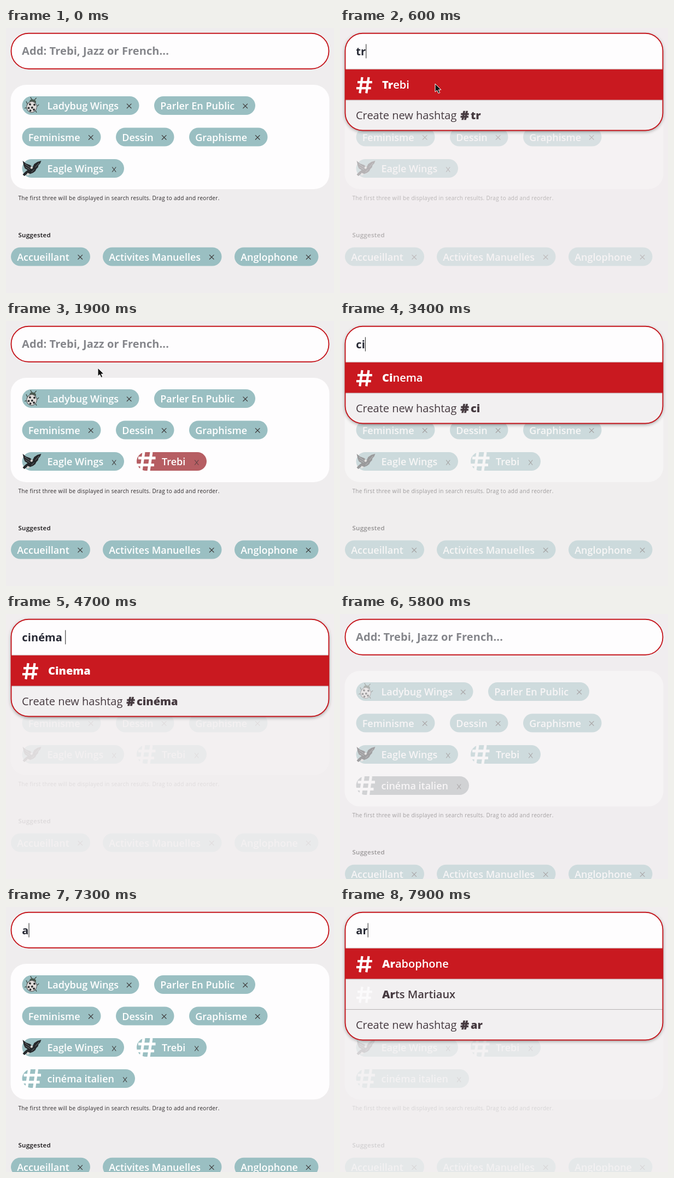
Recreate the animation shown at these times as an HTML page. Size 600x485 px, loop 8000 ms.

```html
<!DOCTYPE html>
<html lang="en">
<head>
<meta charset="utf-8">
<title>Tag input</title>
<style>
  html, body { margin: 0; width: 100%; height: 100%; overflow: hidden; background: #efedee; }
  svg { display: block; }
  text { font: 600 20px "Open Sans", "Noto Sans", sans-serif; white-space: pre; }
  .pill { font-size: 18px; fill: #fff; }
  .input { font-weight: 700; letter-spacing: .1px; }
  .note { font-size: 10px; font-weight: 400; letter-spacing: .31px; fill: #2e2a2c; }
  .head { font-size: 11.5px; letter-spacing: .28px; fill: #151214; }
  .strong { font-weight: 800; }
  .sign { font-weight: 800; font-size: 23px; stroke: currentColor; stroke-width: .7; }
  .plain { font-weight: 400; }
</style>
</head>
<body>
<svg id="stage" width="600" height="485" viewBox="0 0 600 485"></svg>
<script>
const LOOP = 8000, ROW = 56, FADE = 600, PULSE = 1250;
const RED = [201, 25, 32], TEAL = [154, 191, 194];
const stage = document.getElementById('stage');

// keys: time of each key press; drop: time the list opens
const sessions = [
  { drop: 300, close: 950, text: 'tr', keys: [100, 350] },
  { drop: 3180, close: 5700, text: 'cinéma italien',
    keys: [3000, 3280, 3500, 3780, 3950, 4150, 4430, 4750, 4850, 4950, 5050, 5150, 5250, 5350] },
  { drop: 7450, close: LOOP, text: 'ar', keys: [7250, 7650] }
];
const words = ['Trebi', 'Cinema', 'Arabophone', 'Arts Martiaux'];

// left, right, top, label, icon, time added
const tags = [
  [29.5, 243.5, 125, 'Ladybug Wings', ladybug],
  [271, 456, 125, 'Parler En Public'],
  [29.5, 173.5, 182.5, 'Feminisme'],
  [201, 307.5, 182.5, 'Dessin'],
  [335, 478.5, 182.5, 'Graphisme'],
  [29.5, 216, 240, 'Eagle Wings', eagle],
  [239, 367, 240, 'Trebi', hash, sessions[0].close],
  [29.5, 236, 297, 'cinéma italien', hash, sessions[1].close]
];
const suggested = [
  [9, 154, 401.5, 'Accueillant'],
  [177, 394.5, 401.5, 'Activites Manuelles'],
  [418, 571.5, 401.5, 'Anglophone']
];

const clamp = v => Math.min(1, Math.max(0, v));
const ease = p => 1 - (1 - clamp(p)) ** 2.2;
const mix = (a, b, p) => `rgb(${a.map((v, i) => Math.round(v + (b[i] - v) * p))})`;
const fold = s => s.normalize('NFD').replace(/[\u0300-\u036f]/g, '').toLowerCase().trim();
const text = (x, y, s, cls, fill) =>
  `<text x="${x}" y="${y}" class="${cls}"${fill ? ` fill="${fill}" color="${fill}"` : ''}>${s}</text>`;
const rect = (x, y, w, h, fill, r = 0, more = '') =>
  `<rect x="${x}" y="${y}" width="${w}" height="${h}" rx="${r}" fill="${fill}" ${more}/>`;

function hash(x, y, scale = 1, color = '#fff') {
  return `<path transform="translate(${x} ${y}) scale(${scale})" fill="none" stroke="${color}"
    stroke-width="5" d="M13 0L8 34.5M27 0L22 34.5M3 10.7H34.5M.5 23.6H32"/>`;
}

function ladybug(x, y) {
  const dots = [[-4, -4], [4, -5], [-5, 3], [1, 1], [5, 4], [-1, 7]]
    .map(([a, b]) => `<circle cx="${a}" cy="${b}" r="1.9"/>`).join('');
  return `<g transform="translate(${x + 17.5} ${y + 19.5}) rotate(12)" fill="#26282a">
    <path d="M-9 -4L-12 -8M-9 3L-12 5M8 5L11 8M9 -3L12 -7M-2 -13L-6 -17M2 -13L5 -18" stroke="#35403a" stroke-width="1.2"/>
    <ellipse cy="-10" rx="6" ry="4" fill="#4b5a50"/>
    <ellipse rx="9.3" ry="10" fill="#dedad8" stroke="#55585a"/>${dots}</g>`;
}

function eagle(x, y) {
  return `<g transform="translate(${x} ${y})">
    <path fill="#25272a" d="M1 3L7 8L15 11L19 15L22 9L28 5L35 3L33 8L30 11L29 15L26 18L24 22L20 25L15 27L10 26L4 31L1 28L6 23L10 20L5 17L3 12Z"/>
    <path stroke="#777b7e" fill="none" d="M5 9L15 16M6 14L14 19M24 15L31 7M17 24L22 19"/>
    <path fill="#d9d6d2" d="M16 13L20 15L18 18L15 17ZM10 25L14 27L11 30L8 29Z"/></g>`;
}

function pill([left, right, top, label, icon, added], t) {
  if (t < added) return '';
  const age = t - added;
  const glow = age < PULSE ? Math.sin(Math.PI * age / PULSE) ** 1.4 : 0;
  const [a, b, cy] = icon && icon !== ladybug ? [3.5, 4.5, 19] : [4.2, 4.2, 17.8];
  return rect(left, top, right - left, 34, mix(TEAL, RED, glow), 17) +
    (icon ? icon(left, top) : '') +
    text(left + (icon ? 46 : 11.2), top + 24.4, label, 'pill') +
    `<path transform="translate(${right - 18.3} ${top + cy})" d="M${-a} ${-b}L${a} ${b}M${a} ${-b}L${-a} ${b}"
      stroke="#3b3636" stroke-width="1.1" opacity="${1 - .5 * glow}"/>`;
}

function veil(t) {
  const s = sessions.filter(s => t >= s.drop).pop();
  if (!s) return 0;
  const shade = time => .9 * ease((time - s.drop) / FADE);
  return t < s.close ? shade(t) : shade(s.close) * (1 - ease((t - s.close) / FADE));
}

function page(t) {
  const shift = t >= sessions[1].close ? 57.3 : 0;
  return rect(0, 0, 600, 485, '#efedee') +
    rect(8.5, 104, 583, 191 + shift, '#fefdfe', 28) +
    tags.map(p => pill(p, t)).join('') +
    `<g transform="translate(0 ${shift})">` +
    text(22.5, 315, 'The first three will be displayed in search results. Drag to add and reorder.', 'note') +
    text(22.5, 382.5, 'Suggested', 'head') + suggested.map(p => pill(p, t)).join('') + '</g>' +
    rect(0, 0, 600, 485, '#f2eff0', 0, `opacity="${veil(t)}"`);
}

function rows(typed) {
  const key = fold(typed);
  const hits = words.filter(w => fold(w).startsWith(key));
  const ink = i => i ? '#463a40' : '#fff';
  const y = 76 + hits.length * ROW, last = ink(hits.length);
  const lines = hits.map((w, i) =>
    hash(29.5, 90 + i * ROW, .85, i ? '#fbfafb' : '#fff') +
    text(77, 111 + i * ROW, `<tspan class="strong">${w.slice(0, key.length)}</tspan>${w.slice(key.length)}`, '', ink(i)));
  const body = rect(9, 75.7, 582, 55.8, mix(RED, RED, 0), 0, 'style="filter:drop-shadow(0 0 1px rgba(0,0,0,.4))"') +
    lines.join('') + (hits.length > 1 ? rect(9, y - 1, 582, 1, '#b5b1b3') : '') +
    text(29, y + 35, 'Create new hashtag', 'plain', last) +
    text(220.5, y + 35.5, '#', 'sign', last) + text(239, y + 35, typed, 'strong', last);
  return { height: 65.8 + (hits.length + 1) * ROW, body };
}

function field(t) {
  const s = sessions.find(s => t >= s.keys[0] && t < s.close);
  const shape = (h, fill, more) => rect(9.5, 9.7, 581, h, fill, 32, more);
  const border = h => shape(h, 'none', 'stroke="#c5161d" stroke-width="1.9"');
  const closed = shape(65, '#fefdfe') + border(65);
  if (!s) {
    const last = sessions.filter(s => t >= s.close).pop();
    const blink = last ? t - last.close - 150 : -1;
    const caret = blink >= 0 && blink % 1000 < 500;
    return closed + text(29, 49.3, 'Add: Trebi, Jazz or French...', 'input', '#85868b') +
      (caret ? rect(29.5, 29, 1, 26, '#333') : '');
  }
  const typed = s.text.slice(0, s.keys.filter(k => k <= t).length);
  const entry = `<text id="typed" x="29.3" y="50" class="input" fill="#262833">${typed}</text>` +
    rect(0, 29.5, 1, 26, '#222', 0, 'id="caret"');
  if (t < s.drop) return closed + entry;
  const { height, body } = rows(typed);
  return `<clipPath id="box">${shape(height, '#000')}</clipPath>` +
    shape(height, '#f2f0f1', 'style="filter:drop-shadow(0 2px 3px rgba(0,0,0,.4))"') +
    `<g clip-path="url(#box)">${rect(9, 9, 582, 67, '#fefdfe')}${body}</g>` + border(height) + entry;
}

function pointer(t) {
  if (t < 500 || t >= 3000) return '';
  const p = ease((t - 1200) / 700);
  return `<path transform="translate(${174 - 6 * p} ${102 - 16 * p})" fill="#111" stroke="#fff"
    d="M0 0V15L3.5 12L6 17.5L8.7 16.4L6.3 11H11Z"/>`;
}

function draw(now) {
  const t = now % LOOP;
  stage.innerHTML = page(t) + field(t) + pointer(t);
  const typed = document.getElementById('typed');
  if (typed) document.getElementById('caret').setAttribute('x', 29.3 + typed.getComputedTextLength());
}

const start = performance.now();
function tick(now) {
  draw(Math.max(0, now - start));
  requestAnimationFrame(tick);
}
requestAnimationFrame(tick);
</script>
</body>
</html>
```
